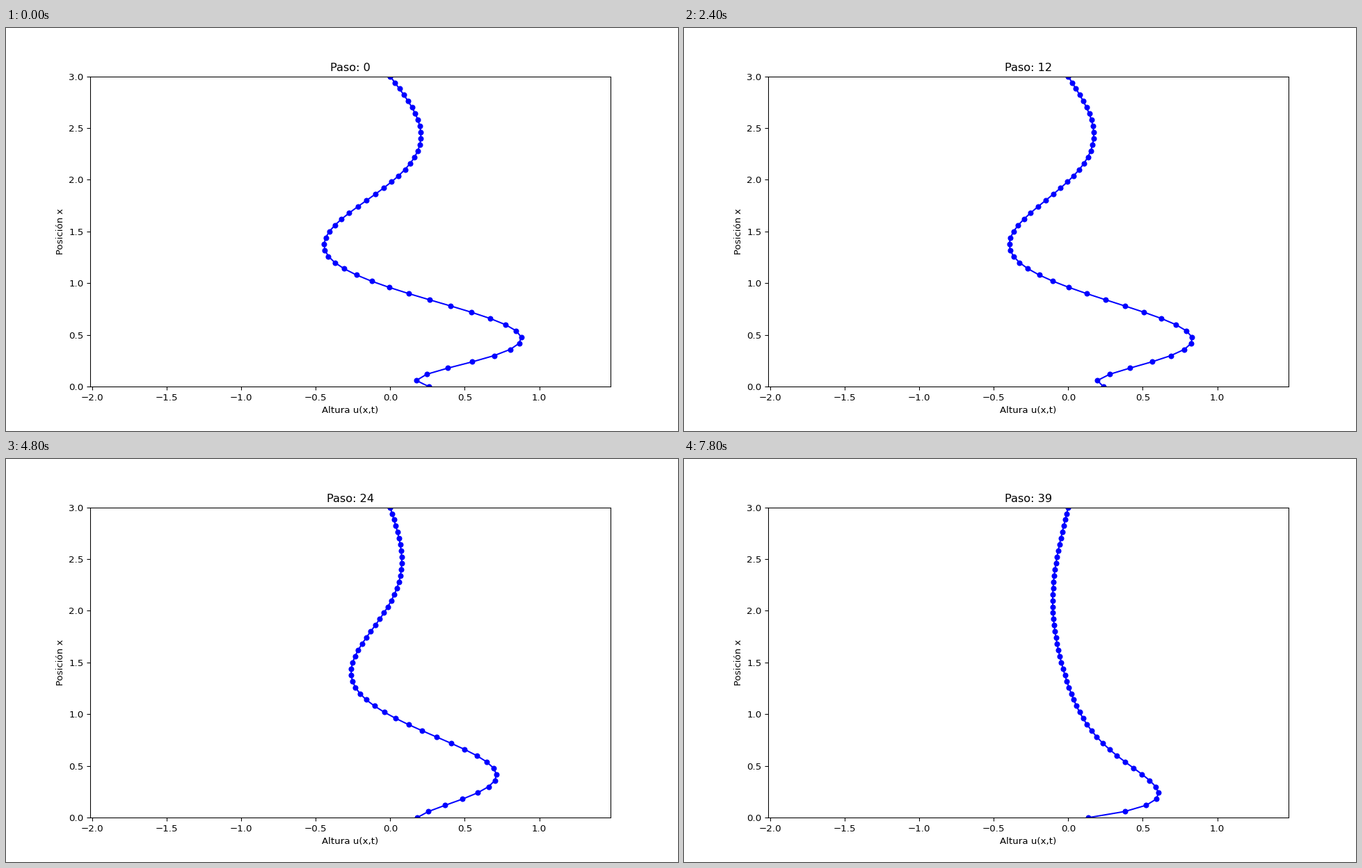
A matplotlib script that plays this animation: 966 px wide and 580 px high, repeating every 8 s.

```python
import numpy as np
import matplotlib.pyplot as plt
from matplotlib.animation import FuncAnimation

# Hanging chain: u_tt = g (x u_x)_x, free at x = 0 and fixed at x = L
G, L, DT = 9.81, 3.0, 1 / 300
NODES, MODES, STEPS = 51, 8, 40

x = np.linspace(0, L, NODES)
theta = (np.arange(200) + 0.5) * np.pi / 200


def j0(z):
    """Bessel function J0 from its integral form."""
    return np.cos(np.multiply.outer(z, np.sin(theta))).mean(axis=-1)


def j0_zeros(count):
    """First zeros of J0 by the McMahon expansion."""
    b = (np.arange(1, count + 1) - 0.25) * np.pi
    e = 8 * b
    return b + 1 / e - 124 / (3 * e**3) + 120928 / (15 * e**5)


zeros = j0_zeros(MODES)
omega = zeros / 2 * np.sqrt(G / L) * DT
shapes = j0(np.outer(np.sqrt(x / L), zeros))

# The chain is released at rest from a shape given by a few nodes
start = {0: 0.260, 1: 0.174, 2: 0.246, 5: 0.696, 8: 0.878,
         12: 0.545, 18: -0.228, 23: -0.442, 31: -0.102, 40: 0.206}
amps = np.linalg.lstsq(shapes[list(start)], list(start.values()),
                       rcond=None)[0]


def height(step):
    return shapes @ (amps * np.cos(omega * step))


fig, ax = plt.subplots(figsize=(10, 6.0042), dpi=96.6)
line, = ax.plot(height(0), x, "bo-", markersize=5)
ax.set_xlim(-2.0138, 1.4797)
ax.set_ylim(0, L)
ax.set_xlabel("Altura u(x,t)")
ax.set_ylabel("Posición x")
title = ax.set_title("Paso: 0")


def update(step):
    line.set_xdata(height(step))
    title.set_text(f"Paso: {step}")
    return line, title


anim = FuncAnimation(fig, update, frames=STEPS, interval=200,
                     repeat=True, repeat_delay=0)
plt.show()
```
